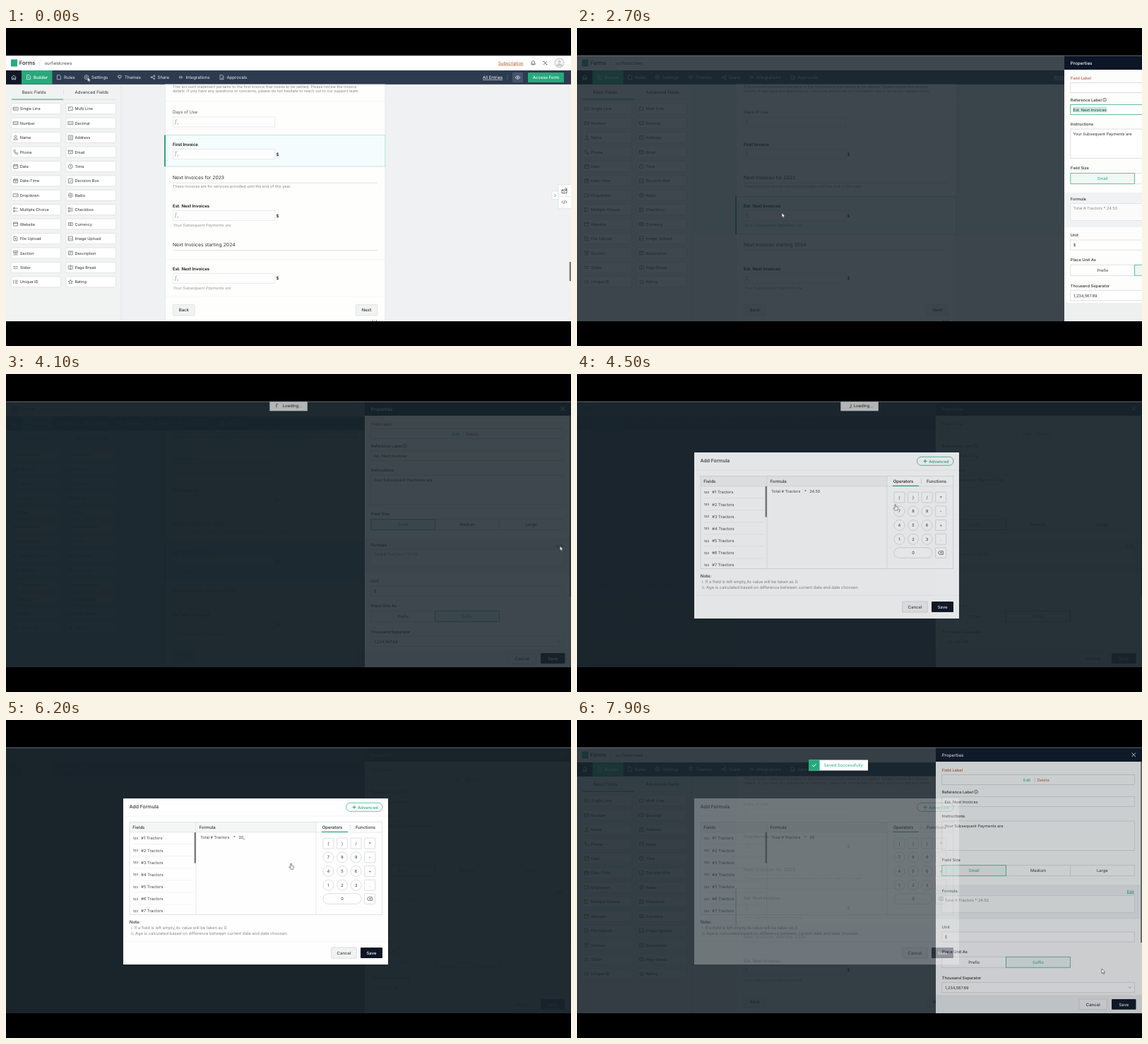
An HTML page that plays this animation: 800x450 px, repeating every 8000 ms.

```html
<!DOCTYPE html>
<html lang="en">
<head>
<meta charset="utf-8">
<title>Form builder: edit a formula</title>
<style>
html, body { margin: 0; width: 100%; height: 100%; overflow: hidden; background: #000; }
svg { display: block; width: 800px; height: 450px; overflow: hidden; }
text { font-family: Inter, "Open Sans", sans-serif; text-rendering: geometricPrecision; white-space: pre; }
.fx { font-family: "Liberation Serif", "Noto Serif", serif; font-style: italic; }
.spin { animation: spin .8s linear infinite; }
@keyframes spin { to { transform: rotate(360deg); } }
</style>
</head>
<body>
<svg id="stage" viewBox="0 0 800 450"></svg>
<script>
const GREEN = '#27a97c', INK = '#333', GREY = '#888', NAVY = '#0d1626', LINE = '#dcdedf', SHADE = '#19242b';

const text = (x, y, s, size = 6, fill = INK, more = '') =>
  `<text x="${x}" y="${y}" font-size="${size}" fill="${fill}" ${more}>${s}</text>`;
const mid = (x, y, s, size, fill, more = '') => text(x, y, s, size, fill, `text-anchor="middle" ${more}`);
const rect = (x, y, w, h, fill = 'none', stroke = 'none', more = '') =>
  `<rect x="${x}" y="${y}" width="${w}" height="${h}" fill="${fill}" stroke="${stroke}" stroke-width=".7" ${more}/>`;
const path = (d, stroke = '#555', width = .7, more = '') =>
  `<path d="${d}" fill="none" stroke="${stroke}" stroke-width="${width}" ${more}/>`;
const circle = (x, y, r, fill = 'none', stroke = 'none') =>
  `<circle cx="${x}" cy="${y}" r="${r}" fill="${fill}" stroke="${stroke}" stroke-width=".7"/>`;
const at = (x, y, body) => `<g transform="translate(${x} ${y})">${body}</g>`;
const layer = (id, body) => `<g id="${id}">${body}</g>`;
const bold = 'font-weight="600"', medium = 'font-weight="500"', under = 'text-decoration="underline"';
const button = (x, y, w, h, label, fill, ink, stroke = 'none') =>
  rect(x, y, w, h, fill, stroke, 'rx="1"') + mid(x + w / 2, y + h / 2 + 2.1, label, 6, ink, medium);
const spinner = (x, y, color) => at(x, y, `<g class="spin">${path('M0 3A3 3 0 0 1-2.6-1.5', color, .9)}</g>`);

// Icons, centred on 0,0
const ring = 'M-3 0a3 3 0 1 0 6 0a3 3 0 1 0-6 0';
const box = 'M-3-3h6v6h-6z', wide = 'M-3.5-2h7v4h-7z';
const icon = {
  gear: ring + 'M-1.2 0a1.2 1.2 0 1 0 2.4 0a1.2 1.2 0 1 0-2.4 0',
  share: 'M2-2L-2 0L2 2M1.3-2.5h1.4v1.2h-1.4zM-2.7-.6h1.4v1.2h-1.4zM1.3 1.4h1.4v1.2h-1.4z',
  page: 'M-2.5-3h3.5l1.5 1.5V3h-5z',
  copy: 'M-3-3h4.5v4.5h-4.5zM-1.5 1.5V3H3V-1.5H1.5M-.8-2v2.5M-2 -.8h2.5',
  trash: 'M-3-2h6M-1-2v-1h2v1M-2.3-2v5h4.6v-5',
  tools: 'M-2.5-2.5L2.5 2.5M2.5-2.5L-2.5 2.5M-3-1.5l1.5-1.5M1.5 3L3 1.5',
  code: 'M-1.8-1.8L-3.5 0L-1.8 1.8M1.8-1.8L3.5 0L1.8 1.8M.7-2.3L-.7 2.3'
};
const person = 'M-1.5-1.5a1.5 1.5 0 1 0 3 0a1.5 1.5 0 1 0-3 0M-2.7 3c0-3 5.4-3 5.4 0z';
const calendar = 'M-3-2.3h6v5h-6zM-3-.7h6M-1.5-3.2v1.5M1.5-3.2v1.5';
const fields = [
  ['Single Line', wide + 'M-2.2-.8v1.6M-.8 0h2.5'], ['Multi Line', 'M-3-2.5h6v5h-6zM-1.8-1h2M1 1.5l1-1'],
  ['Number', wide + 'M-2-.8v1.6M0-.8v1.6M2-.8v1.6'], ['Decimal', wide + 'M-1.8-.8v1.6M0 .5v.6M1.5-.8v1.6'],
  ['Name', person], ['Address', box + 'M-1.5-1h3M-1.5 1h3'],
  ['Phone', 'M-2.5-2.7l1.5-.3l.8 1.8l-1 .8l2 2l.9-.8l1.6.9l-.5 1.4C0 3.5-3 0-2.5-2.7z'],
  ['Email', 'M-3-2.3h6v4.6h-6zM-3-2l3 2.5L3-2'],
  ['Date', calendar], ['Time', ring + 'M0-1.8V0L1.4 1'],
  ['Date-Time', calendar + 'M0 0v1.5h1.2'], ['Decision Box', box + 'M-1.6 0l1.2 1.3l2.2-2.6'],
  ['Dropdown', wide + 'M.3-.5l1 1l1-1'], ['Radio', icon.gear],
  ['Multiple Choice', 'M-3-3h2v2h-2zM-3 1h2v2h-2zM0-2h3M0 2h3'], ['Checkbox', 'M-3-3h2v2h-2zM-3 1h2v2h-2zM0-2h3.5M0 0h3.5M0 2h3.5'],
  ['Website', 'M-3-2.5h6v5h-6zM-3-1h6'], ['Currency', 'M-3-2h6v4h-6zM-1 0a1 1 0 1 0 2 0a1 1 0 1 0-2 0'],
  ['File Upload', icon.page + 'M0 2v-3M-1 0l1-1l1 1'], ['Image Upload', box + 'M-3 2l2-2.5l1.5 1.5l1-1L3 1.5'],
  ['Section', 'M-3-3h6v2h-6zM-3 .5h6M-3 2.5h6'], ['Description', 'M-3-2.5h6v5h-6zM-1.7-1h3.4M-1.7 1h2'],
  ['Slider', 'M-3.5-1.3h2M0-1.3h3.5M-3.5 1.3h4M2 1.3h1.5M-1.3-2.3v2M1.3.3v2'], ['Page Break', 'M-3-3v6M3-3v6M-1-3h2v2h-2zM-1 1h2v2h-2z'],
  ['Unique ID', 'M-3-2.5v5M-1-2h4M-1 0h4M-1 2h4'], ['Rating', 'M0-3l.9 2h2.2L1.4.4L2 2.7L0 1.4L-2 2.7L-1.4.4L-3.1-1h2.2z']
];
const draw = (x, y, d, color) => at(x, y, path(d, color, .65));

function topBars() {
  const nav = [['Rules', 75, icon.page], ['Settings', 114, icon.gear], ['Themes', 161, 'M-2-2.5h4v3h-4zM0 .5v2.5M-3-1h1'],
    ['Share', 208, icon.share], ['Integrations', 247.5, 'M-3 0h2M1 0h2M-1-2v4M1-2v4'], ['Approvals', 305.5, icon.page + 'M-1 1l1 1l2-3']];
  const navX = [82, 121, 168, 214.5, 254.5, 312.5];
  return rect(0, 39, 800, 21, '#fff') + rect(7, 44.5, 9, 10, GREEN) +
    text(18.8, 52.3, 'Forms', 7.6, '#222', medium) + path('M49 44l-2 11', '#ddd', .5) + text(54.5, 51.7, 'ourfieldcrews', 6, '#444') +
    text(697, 51.7, 'Subscription', 6, '#b4582f', under) +
    draw(746.5, 49.5, 'M-3 1.7h6L2 .4V-1C2-3.7-2-3.7-2-1V.4zM-1 2.7h2', '#222') + draw(763.5, 49.5, icon.tools, '#222') +
    circle(783.5, 49.5, 6.5, '#f3f4f5', '#aaa') + circle(783.5, 47.5, 2, '#c9cdd0') + `<path d="M779 54c0-5 9-5 9 0z" fill="#c9cdd0"/>` +
    rect(0, 60, 800, 19.5, '#2d3b50') + rect(0, 60, 22, 19.5, '#0f1827') + draw(11, 70, 'M-3.5 0L0-3.2L3.5 0M-2.5-.5V3h1.7V.8h1.6V3h1.7V-.5', '#fff') +
    rect(22, 60, 43.5, 19.5, GREEN) + draw(32, 69.7, icon.page + 'M-1 0h2', '#fff') + text(39, 71.9, 'Builder', 6, '#fff', medium) +
    nav.map(([name, x, d], i) => draw(x, 69.7, d, '#d7dce3') + text(navX[i], 71.9, name, 6.05, '#e8ebef')).join('') +
    text(675, 71.9, 'All Entries', 6, '#fff', under) + path('M710 66v8', '#68758a', .5) + rect(717, 63, 15, 14, '#46546a', 'none', 'rx="1"') +
    draw(724.5, 70, 'M-3.5 0Q0-4.5 3.5 0Q0 4.5-3.5 0zM-1 0a1 1 0 1 0 2 0a1 1 0 1 0-2 0', '#fff') +
    button(739, 63, 51, 14, 'Access Form', GREEN, '#fff');
}

function sidebar() {
  return rect(0, 79.5, 163, 336, '#f1f2f2') + path('M163 79.5V415', '#dfe1e2', .7) +
    mid(39.7, 93.1, 'Basic Fields', 6.05, INK) + mid(121.3, 93.1, 'Advanced Fields', 6.05, INK) + path('M81.5 87v8', '#ccc', .5) +
    path('M8 101H155', '#d9dbdc', .6) + path('M8 101H81', GREEN, 1) +
    fields.map(([name, d], i) => {
      const x = i % 2 ? 85 : 7.3, y = 114.2 + (i >> 1) * 20.42;
      return rect(x, y - 7.4, 70.3, 14.8, '#fff', LINE, 'rx="1"') + draw(x + 6.3, y, d) + text(x + 12.4, y + 2.1, name, 5.6);
    }).join('');
}

const formula = y => rect(236.3, y - 7, 144.5, 14, '#fdfdfd', '#e1e3e3') +
  text(239, y + 2, 'f', 8.5, '#999', 'class="fx"') + text(242, y + 3.5, 'x', 5.5, '#999', 'class="fx"');
const selected = (id, y, h) => layer(id, rect(225.3, y, 311.5, h, '#f5fcfd', '#a4dccb') + rect(224, y, 2, h, GREEN));
const estimate = y => text(236, y, 'Est. Next Invoices', 6.05, '#111', bold) + formula(y + 11) + text(382.5, y + 13.2, '$', 6, '#222', bold) +
  text(236.8, y + 26.6, 'Your Subsequent Payments are', 5.5, '#999', 'font-style="italic"');

function form() {
  return rect(163, 79.5, 637, 336, '#f0f1f2') + rect(225.3, 79, 311.5, 337, '#fefefd', '#e3e4e4') +
    text(236, 84.6, 'This account statement pertains to the first invoice that needs to be settled. Please review the invoice', 5.45, GREY) +
    text(236, 91.4, 'details. If you have any questions or concerns, please do not hesitate to reach out to our support team.', 5.45, GREY) +
    path('M225 103.5H537M225 327.3H537M225 380H537', '#eceeee', .6) +
    text(236, 121, 'Days of Use', 6.1, '#555') + formula(133) +
    selected('pickFirst', 151.5, 44.5) + selected('pickNext', 238.5, 53) +
    text(236, 167.3, 'First Invoice', 6.1, '#111', bold) + formula(178.3) + text(382.5, 180.5, '$', 6, '#222', bold) +
    text(236, 213.7, 'Next Invoices for 2023', 6.8) + path('M236 219.3H526', '#d5d7d8', .7) +
    text(236, 226.4, 'These invoices are for services provided until the end of this year.', 5.4, GREY) +
    estimate(254.4) + text(236, 309.2, 'Next Invoices starting 2024', 6.8) + path('M236 314.6H526', '#d5d7d8', .7) + estimate(343.2) +
    button(236.3, 391.5, 31, 15.5, 'Back', '#f1f2f2', INK, LINE) + button(495, 391.5, 31, 15.5, 'Next', '#f1f2f2', INK, LINE) +
    text(517, 417.2, '3/4', 5.5, '#555') +
    layer('hover', rect(225.5, 238.5, 311.5, 53, 'none', '#333', 'stroke-dasharray="1.4 1"') + rect(538, 238.5, 13.5, 44, '#fff', '#ddd') +
      draw(544.5, 246.3, icon.gear, '#333') + draw(544.5, 260.7, icon.copy, '#333') + draw(544.5, 275.2, icon.trash, '#333')) +
    rect(782, 221.5, 19, 34, '#fff', '#ddd') + path('M782 238.5H800', '#ddd', .6) + rect(773, 231, 9, 11.5, '#fff', '#ddd') +
    path('M776.5 234.7l2 2.2l-2 2.2', GREEN, .9) + draw(790.5, 230.5, 'M-3.5-1.5h7v4.5h-7zM-3.5-1.5L0 1L3.5-1.5M1-3.5h2.5v2', '#222') +
    draw(790.5, 246.4, icon.code, '#222') + rect(797.7, 331, 2.3, 27, '#777');
}

function panel() {
  const label = (y, s, fill = INK) => text(516.8, y, s, 5.7, fill, medium);
  const choice = (i, y, s, on) => rect(516.8 + i * 90.8, y, 90.8, 15, on ? '#eff8f5' : '#fff', on ? GREEN : '#d3d6d7') +
    mid(562.2 + i * 90.8, y + 9.6, s, 5.8, on ? GREEN : INK);
  return rect(508, 39, 292, 376, '#fdfdfc') + rect(508, 39, 292, 20, NAVY) + text(516.8, 51.6, 'Properties', 6.2, '#fff', medium) +
    path('M785.5 46.5l5.5 5.5M791 46.5l-5.5 5.5', '#fff', .9) + label(73.1, 'Field Label', '#b5603e') +
    rect(516.8, 77.5, 272.5, 14, '#fff', '#cfd2d3') +
    text(632, 86.9, 'Edit', 5.7, GREEN) + path('M648.3 81.5v7', '#bbb', .5) + text(651.5, 86.9, 'Delete', 5.7, '#b5603e') +
    label(103.8, 'Reference Label') + circle(565, 101.7, 2.4, 'none', '#444') + path('M565 101v2M565 100v.5', '#444', .5) +
    rect(516.8, 108.5, 272.5, 13.8, '#fff', '#d3d6d7') +
    layer('focus', rect(516.8, 108.5, 272.5, 13.8, '#fff', GREEN) + rect(520, 111.5, 48.5, 8, '#c5e9df')) +
    text(520.5, 117.5, 'Est. Next Invoices', 5.6) +
    label(138.2, 'Instructions') + rect(516.8, 143, 272.5, 41.3, '#fff', '#cfd2d3') + text(520.5, 152.2, 'Your Subsequent Payments are', 5.6) +
    label(200.4, 'Field Size') + choice(1, 205.5, 'Medium') + choice(2, 205.5, 'Large') + choice(0, 205.5, 'Small', true) +
    rect(508, 233, 292, 49, '#f1f2f3') + label(244.3, 'Formula') + text(778.5, 244.5, 'Edit', 5.8, GREEN, under) +
    rect(516.8, 248.5, 272.5, 24, '#fbfbfb', '#dcdfe0') + text(520.5, 256.8, 'Total # Tractors * 24.50', 5.6, GREY) +
    label(295.4, 'Unit') + rect(516.8, 300, 272.5, 14, '#fff', '#d3d6d7') + text(520.8, 309.2, '$', 5.6) +
    label(330.2, 'Place Unit As') + choice(0, 335.2, 'Prefix') + choice(1, 335.2, 'Suffix', true) +
    label(366.5, 'Thousand Separator') + rect(516.8, 371.3, 272.5, 14.5, '#fff', '#d3d6d7') + text(521, 380.8, '1,234,567.89', 5.6) +
    path('M781 377.5l1.8 1.8l1.8-1.8', '#777') + rect(508, 389, 292, 26.5, '#eeefef') +
    button(711, 395, 39.5, 14.8, 'Cancel', '#f2f3f3', INK, '#ccd0d2') + button(757, 395, 34.5, 14.8, 'Save', NAVY, '#fff') +
    rect(798, 59, 2, 256, '#7c8083');
}

const typed = [['24.50', 0], ['24.5_', 5200], ['24_', 5300], ['_', 5400], ['3_', 5500], ['30_', 5700], ['30', 7700]];

function keypad() {
  return ['()/*', '789-', '456+', '123.'].map((row, r) => [...row].map((c, i) => {
    const x = 456.4 + i * 19.6, y = 174.6 + r * 19.7;
    const square = r === 0 || i === 3;
    return (square ? rect(x - 7.5, y - 7.5, 15, 15, '#fff', '#cdd1d3', 'rx="1"') : circle(x, y, 7.5, '#fff', '#cdd1d3')) + mid(x, y + 2.1, c, 5.8, INK);
  }).join('')).join('') + rect(449, 245.7, 54, 14.6, '#fff', '#cdd1d3', 'rx="7.3"') + mid(476, 255.1, '0', 5.8, INK) +
    rect(507.6, 245.7, 15, 14.6, '#fff', '#cdd1d3', 'rx="1"') + draw(515, 253, 'M-3.7 0l2-2.3h5v4.6h-5zM-.5-1l2 2M1.5-1l-2 2', '#333');
}

function modal() {
  const rows = [1, 2, 3, 4, 5, 6, 7].map(n => {
    const y = 152.3 + n * 17.1;
    return text(179.8, y - .3, '123', 4.3, '#444', medium) + text(191.3, y, `#${n} Tractors`, 5.75, '#444') +
      (n < 7 ? path(`M179 ${y + 6.2}H265`, '#e8eaea', .6) : '');
  }).join('');
  return rect(166, 111, 375, 235, '#fefefe') + text(174.8, 125.1, 'Add Formula', 6.8, INK, medium) +
    rect(481.5, 117.3, 51.5, 12, '#fff', GREEN, 'rx="6"') + path('M490.5 123.4h5M493 120.9v5', GREEN, 1) + text(498.3, 125.6, 'Advanced', 5.8, GREEN, medium) +
    path('M166 136H541M166 313.3H541', '#eceeee', .6) + rect(175, 144.5, 264, 14.3, '#f4f5f5') + rect(175, 144.5, 357.7, 131, 'none', '#d8dbdc') +
    path('M269 144.5v131M439 144.5v131M175 158.8H532.7', '#d8dbdc', .6) +
    text(179.3, 154, 'Fields', 6, INK, medium) + text(273.5, 154, 'Formula', 6, INK, medium) + rows + rect(266.6, 159, 2.3, 43.5, '#777') +
    text(275.2, 167.6, 'Total # Tractors', 5.55, '#444') + text(322, 168, '*', 5.6, '#444') +
    typed.map(([s], i) => layer('typed' + i, text(329.2, 167.6, s, 5.6, '#444'))).join('') +
    mid(462, 154, 'Operators', 6, '#222', medium) + mid(509, 154, 'Functions', 6, INK, medium) + path('M487.3 148v7.5', '#bbb', .5) +
    path('M447 158.4H484', GREEN, 1.1) + keypad() +
    text(174.8, 287.9, 'Note:', 6.1, INK, medium) +
    text(177, 296.4, 'i. If a field is left empty,its value will be taken as 0.', 5.8, GREY) +
    text(177, 303.7, 'ii. Age is calculated based on difference between current date and date choosen.', 5.8, GREY) +
    layer('idle', button(460.8, 322, 35.5, 15, 'Cancel', '#f1f3f3', '#444', '#ccd0d2') + button(502, 322, 31, 15, 'Save', NAVY, '#fff')) +
    layer('busy', button(452.3, 322, 35.5, 15, 'Cancel', '#f1f3f3', '#444', '#ccd0d2') + rect(494, 322, 39, 15, NAVY, 'none', 'rx="1"') +
      text(511, 331.6, 'Save', 6, '#fff', medium) + spinner(506.5, 329.6, '#6f9cc8'));
}

const loading = rect(373.3, 39, 53.5, 13.3, '#b3b6b7') + spinner(385.5, 45, '#222') + text(391.5, 46.9, 'Loading...', 6, '#222');
const toast = rect(328, 56.5, 84, 15, '#fff') + rect(328, 56.5, 15.5, 15, GREEN) +
  path('M333 64l2 2l3.6-4', '#fff', 1) + text(349.5, 66.1, 'Saved Successfully', 6, GREEN);
const arrow = `<path d="M0 0V6.6L1.5 5.3L2.5 7.6L3.6 7.1L2.6 4.9H4.7Z" fill="#fff" stroke="#111" stroke-width=".5"/>`;
const hand = `<path d="M-.7 4.6V.7Q0-.4 .7 .7V3.2L3.3 3.8Q4 4 3.8 5L3 8.5H-.3L-2.6 5.6Q-2.3 4.4-.7 5.8Z" fill="#fff" stroke="#222" stroke-width=".6"/>`;

document.getElementById('stage').innerHTML =
  form() + sidebar() + topBars() + layer('dim', rect(0, 39, 800, 376.5, SHADE)) + layer('panel', panel()) +
  layer('veil', rect(0, 39, 800, 376.5, SHADE)) + layer('loading', loading) + layer('modal', modal()) + layer('toast', toast) +
  rect(0, 0, 800, 39, '#000') + rect(0, 415, 800, 35, '#000') + path('M0 39.2H800', '#8b9092', .7) +
  layer('cursor', layer('arrow', arrow) + layer('hand', hand));

// Each track is a list of [ms, declaration] over one 8 s loop
let css = '';
function track(id, keys, ease = 'linear') {
  const all = [[0, keys[0][1]], ...keys, [8000, keys[keys.length - 1][1]]];
  css += `@keyframes ${id}{${all.map(([ms, rule]) => `${ms / 80}%{${rule}}`).join('')}}#${id}{animation:${id} 8s ${ease} infinite}`;
}
const fade = (id, keys) => track(id, keys.map(([ms, o]) => [ms, `opacity:${o}`]));
const move = (id, keys) => track(id, keys.map(([ms, x, y]) => [ms, `transform:translate(${x}px,${y}px)`]), 'ease-in-out');
function show(id, ...spans) {
  const keys = [[0, 'opacity:0']];
  for (const [from, to] of spans) keys.push([from, 'opacity:1'], [to, `opacity:${to < 8000 ? 0 : 1}`]);
  track(id, keys, 'step-end');
}

show('pickFirst', [0, 2400]);
show('pickNext', [2400, 8000]);
show('hover', [1000, 2400]);
show('focus', [2400, 3900]);
fade('dim', [[2400, 0], [2600, .84]]);
move('panel', [[2530, 292, 0], [2930, 0, 0]]);
fade('veil', [[3900, 0], [4000, .84], [4350, .84], [4550, .97], [7700, .97], [7900, .22], [8000, .08]]);
track('loading', [[3940, 'opacity:0;transform:none'], [3960, 'opacity:1;transform:none'], [4500, 'opacity:1;transform:none'],
  [4700, 'opacity:.6;transform:translateY(-10.5px)'], [4760, 'opacity:0;transform:translateY(-14px)']]);
fade('modal', [[4350, 0], [4520, 1], [7700, 1], [7900, .3], [8000, 0]]);
show('toast', [7700, 8000]);
typed.forEach(([, from], i) => show('typed' + i, [from, i + 1 < typed.length ? typed[i + 1][1] : 8000]));
show('idle', [0, 6880], [7700, 8000]);
show('busy', [6880, 7700]);
show('hand', [700, 2450], [4450, 7000]);
show('arrow', [0, 700], [2450, 4450], [7000, 8000]);
move('cursor', [[50, 115.5, 69.5], [900, 285, 257], [1500, 292.5, 261.5], [2400, 292.5, 261.5], [2500, 290, 261.5], [2850, 290, 261.5],
  [3750, 784.3, 243.3], [4150, 784.3, 243.3], [4650, 375, 171], [6000, 375, 171], [6650, 518, 329.5], [6930, 518, 329.5],
  [7550, 737.5, 349.3], [7700, 737.5, 349.3], [7880, 743, 352]]);

const sheet = document.createElement('style');
sheet.textContent = css;
document.head.append(sheet);
</script>
</body>
</html>
```
